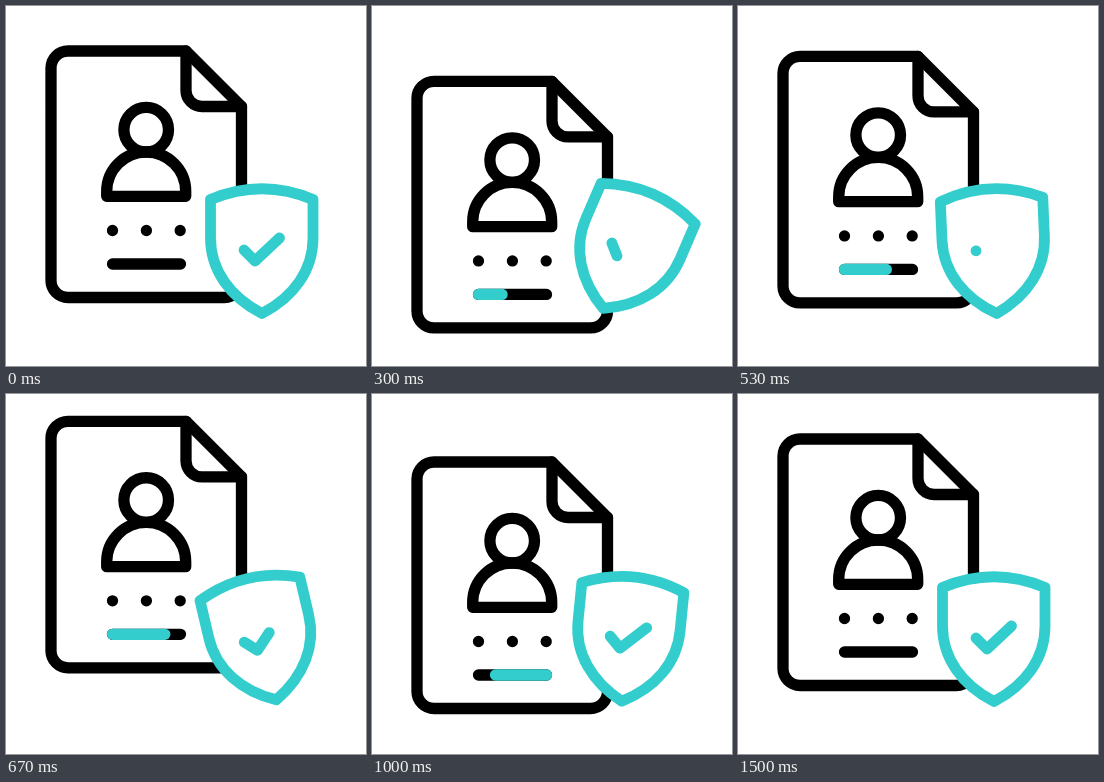
An HTML page that plays this animation: 360 by 360 pixels, repeating every 1.67 s.

```html
<!DOCTYPE html>
<html lang="en">
<head>
<meta charset="utf-8">
<title>Verified document</title>
<style>
  html, body { margin: 0; width: 100%; height: 100%; overflow: hidden; background: #fff; }
  svg { display: block; width: 100vw; height: 100vh; }
  .ink, .teal { fill: none; stroke: #000; stroke-width: 11.3; stroke-linecap: round; stroke-linejoin: round; }
  .teal { stroke: #33cdcd; }
</style>
</head>
<body>
<svg viewBox="0 0 360 360">
  <g id="page">
    <g class="ink">
      <path d="M180 45H62a17 17 0 0 0-17 17V274.500a17 17 0 0 0 17 17H218.500a17 17 0 0 0 17-17V100.500Z"/>
      <path d="M180 45V84.500a16 16 0 0 0 16 16H235.500"/>
      <circle cx="140.200" cy="123.700" r="22.300"/>
      <path d="M100.700 190.300V185.500a39.500 39.500 0 0 1 79 0V190.300Z"/>
      <path d="M106.500 224.500h0M140.400 224.500h0M174.200 224.500h0M106.500 258H174.500"/>
    </g>
    <path id="bar" class="teal"/>
  </g>
  <g id="shield">
    <path class="teal" style="fill:#fff;stroke-width:10.800" d="M204.500 193.500Q256 172 307 193.500V232C307 264 288 291 256 307.500C224 291 204.500 264 204.500 232Z"/>
    <path id="tick" class="teal" style="stroke-width:10.800"/>
  </g>
</svg>
<script>
const LOOP = 1670, FPS = 30, LAST = 45;
const $ = id => document.getElementById(id);
const page = $('page'), bar = $('bar'), shield = $('shield'), tick = $('tick');

// keys: [frame, value] pairs
const lift = [[0, 0], [11, 33], [20.5, -18], [30.1, 23], [39.4, 0]];
const swing = [[0, 0], [10.8, 25], [19, -14], [27.5, 8], [36, -3.5], [45, 0]];
const drawn = [[0, 1], [14, 0], [16, 0], [22, 1]];

const clamp = v => Math.max(0, Math.min(1, v));
const ease = k => (1 - Math.cos(Math.PI * k)) / 2;

function track(keys, n) {
  for (let i = 1; i < keys.length; i++) {
    const [a, u] = keys[i - 1], [b, v] = keys[i];
    if (n <= b) return u + (v - u) * ease((n - a) / (b - a));
  }
  return keys[keys.length - 1][1];
}

function tickPath(part) {
  const a = Math.hypot(11, 11), b = Math.hypot(24.5, 23);
  const len = part * (a + b);
  const p = clamp(len / a), q = clamp((len - a) / b);
  const d = `M238 244L${238 + 11 * p} ${244 + 11 * p}`;
  return q > 0 ? d + `L${249 + 24.5 * q} ${255 - 23 * q}` : d;
}

function render(ms) {
  const t = Math.floor((ms % LOOP) / 10) * 10;
  const n = Math.min(LAST, Math.floor((t + 3.4) * FPS / 1000));

  page.setAttribute('transform', `translate(0 ${track(lift, n)})`);
  shield.setAttribute('transform', `rotate(${track(swing, n)} 256 245)`);
  tick.setAttribute('d', tickPath(track(drawn, n)));

  const from = clamp((n - 25) / 20), to = clamp(n / 26);
  bar.setAttribute('d', to > from ? `M${106.5 + 68 * from} 258H${106.5 + 68 * to}` : '');
}

const start = performance.now();
function loop() {
  render(performance.now() - start);
  requestAnimationFrame(loop);
}
loop();
</script>
</body>
</html>
```
